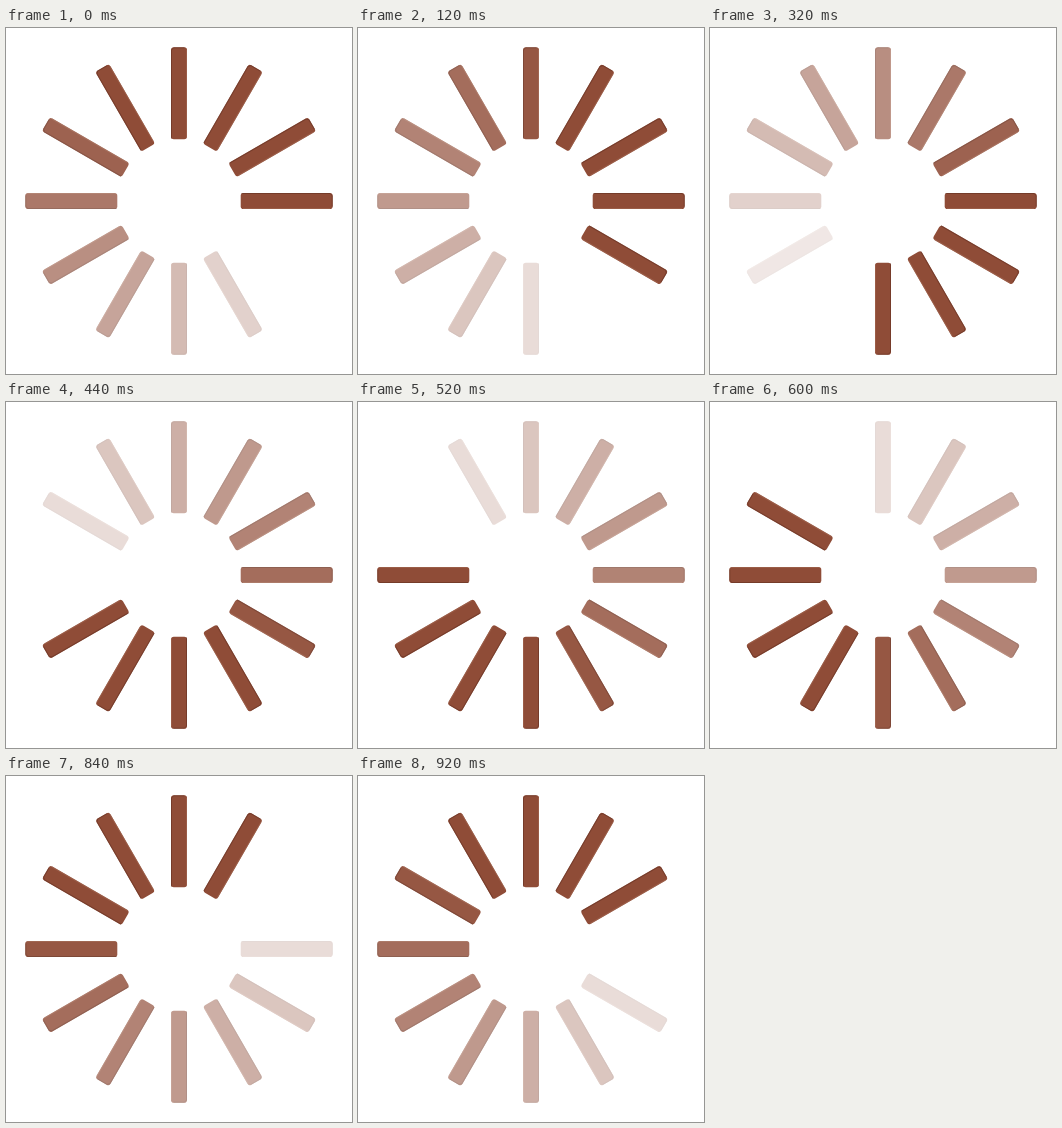
An HTML page for the animation above (0.96 s loop, 346 px wide and 346 px high).

```html
<!DOCTYPE html>
<html lang="en">
<head>
<meta charset="utf-8">
<title>Spinner</title>
<style>
  html, body { margin: 0; width: 100%; height: 100%; overflow: hidden; background: #fff; }
  svg { display: block; width: 100vw; height: 100vh; }
</style>
</head>
<body>
<svg viewBox="0 0 346 346">
  <defs>
    <g id="bar">
      <rect x="-8" y="-153.7" width="16" height="92" rx="2.8" fill="#8f4c37"/>
      <path d="M-7.5 -62.5V-151L-5.5 -153.2H5.5" fill="none" stroke="#6b3626" stroke-opacity=".7"/>
      <path d="M7.5 -151V-64" stroke="#a0644f" stroke-opacity=".7"/>
    </g>
  </defs>
  <g id="ring" transform="translate(173 173)"></g>
</svg>
<script>
  const COUNT = 12, LOOP = 960, STEP = 40, STEPS = LOOP / STEP, LEAD = 3, FADE = 8;
  const ring = document.getElementById('ring');

  const bars = Array.from({ length: COUNT }, (_, i) => {
    const bar = document.createElementNS('http://www.w3.org/2000/svg', 'use');
    bar.setAttribute('href', '#bar');
    bar.setAttribute('transform', `rotate(${i * 360 / COUNT})`);
    return ring.appendChild(bar);
  });

  // Each bar snaps to full strength, holds, then fades evenly until it drops out.
  const strength = age => age >= COUNT - 1 ? 0 : Math.min(1, (COUNT - age) / FADE);

  function draw(time) {
    const step = Math.floor(time % LOOP / STEP);
    // Whole thousandths of a turn, so some bars snap one step late.
    const turn = Math.floor(step * 1000 / STEPS);
    bars.forEach((bar, i) => {
      const age = (turn * COUNT + (LEAD - i + COUNT) * 1000) % (COUNT * 1000) / 1000;
      bar.style.opacity = strength(age);
    });
  }

  let start;
  function tick(now) {
    start ??= now;
    draw(Math.max(0, now - start));
    requestAnimationFrame(tick);
  }
  draw(0);
  requestAnimationFrame(tick);
</script>
</body>
</html>
```
